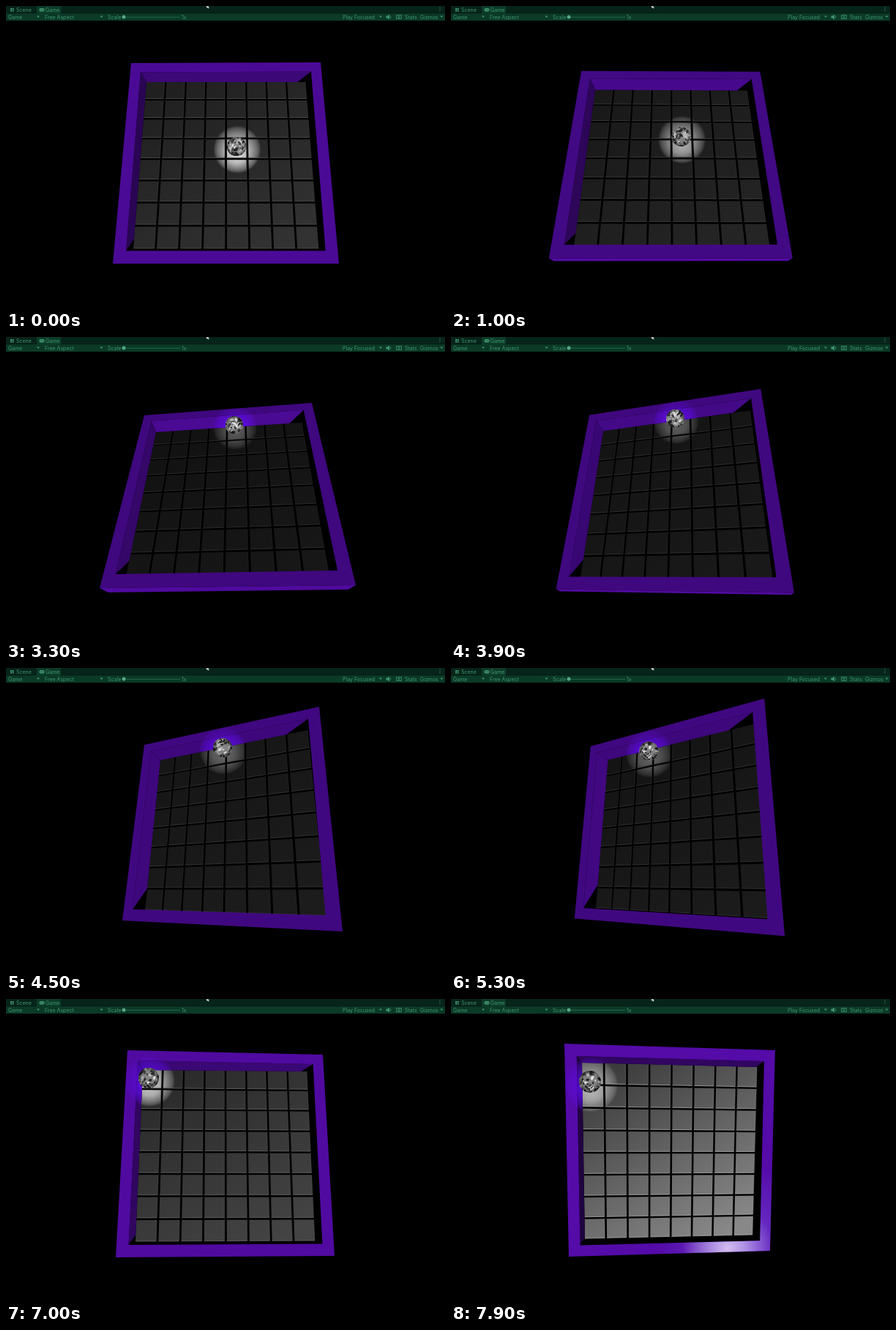
Write an HTML page with a canvas that moves like this. It is 600 px wide and 414 px high and loops after 8 s.

```html
<!DOCTYPE html>
<html lang="en">
<head>
<meta charset="utf-8">
<title>Tilting board</title>
<style>
  html, body { margin: 0; width: 100%; height: 100%; overflow: hidden; background: #000; }
  canvas, svg { position: absolute; left: 0; top: 0; display: block; }
  text { font: 7px Inter, "Open Sans", sans-serif; fill: #41966f; }
</style>
</head>
<body>
<canvas id="stage" width="600" height="414"></canvas>
<svg width="600" height="22" viewBox="0 0 600 22">
  <path d="M0 0H600V10H0z" fill="#07241a"/>
  <path d="M42 0H75V10H42z" fill="#0c3c29"/>
  <path d="M0 10H600V20H0z" fill="#0b3a27"/>
  <path d="M0 9.7H42M75 9.7H600" stroke="#051a12" stroke-width=".7"/>
  <g fill="#41966f">
    <path d="M6 3h2v2H6zM8.6 3h2v2h-2zM6 5.6h2v2H6zM8.6 5.6h2v2h-2z"/>
    <rect x="45.500" y="3" width="7" height="4.500" rx="2"/>
    <path d="M42 13.500h4l-2 2.500zM128.500 13.500h4l-2 2.500zM510 13.500h4l-2 2.500zM593.500 13.500h4l-2 2.500z"/>
    <circle cx="161" cy="15" r="2.500" fill="#57a985"/>
    <path d="M519.500 13.500h2l2.500-2v7l-2.500-2h-2z"/>
    <path d="M592.500 1.500h1v1h-1zM592.500 3.800h1v1h-1zM592.500 6.100h1v1h-1z"/>
  </g>
  <path d="M164 15.300H238" stroke="#2c7353" stroke-width=".8"/>
  <path d="M525 13q2 2 0 4M533.500 12.500h7v5h-7zM535 14.200h4M535 16h4" fill="none" stroke="#41966f" stroke-width=".8"/>
  <circle cx="48" cy="5.200" r=".7" fill="#0c3c29"/>
  <circle cx="50.500" cy="5.200" r=".7" fill="#0c3c29"/>
  <text x="14" y="7.800">Scene</text>
  <text x="54" y="7.800">Game</text>
  <text x="3" y="17.500">Game</text>
  <text x="53" y="17.500">Free Aspect</text>
  <text x="139" y="17.500">Scale</text>
  <text x="240" y="17.500">1x</text>
  <text x="460" y="17.500">Play Focused</text>
  <text x="545" y="17.500">Stats</text>
  <text x="566" y="17.500">Gizmos</text>
  <path d="M273.500 0l4.500 .8-1.300 .8 1 1.200-1 .7-1-1.300-1 .6z" fill="#ddd"/>
</svg>
<script>
const ctx = document.getElementById('stage').getContext('2d');
const LOOP = 8000, STEP = 100, RIM = 0.054, CELLS = 8, TILE = 0.9, SPAN = 7.9;
const times = [0, 2200, 3300, 4500, 6100, 7000, 7900];

// Corner order: back left, back right, front right, front left.
const rims = [
  [171, 78, 430, 77, 455, 352, 146, 352],
  [186, 101, 415, 101, 479, 337, 122, 338],
  [189, 107, 418, 90, 478, 339, 128, 343],
  [189, 105, 428, 53, 460, 360, 159, 345],
  [189, 104, 428, 41, 454, 367, 171, 341],
  [166, 70, 433, 76, 449, 351, 150, 353],
  [155, 61, 443, 70, 436, 344, 161, 352]
];
const floors = [
  [192, 104, 409, 104, 427, 331, 174, 331],
  [203, 126, 400, 126, 443, 325, 162, 325],
  [205, 130, 404, 117, 441, 322, 164, 327],
  [211, 126, 412, 85, 437, 338, 190, 330],
  [213, 122, 412, 77, 432, 341, 199, 325],
  [187, 97, 411, 99, 422, 330, 177, 331],
  [179, 87, 418, 93, 412, 322, 183, 327]
];
// x, y, radius, light strength
const balls = [
  [315, 192, 13, .85], [314, 159, 13, .42], [312, 120, 12, .3], [296, 109, 13, .34],
  [239, 118, 13, .36], [195, 108, 14, .75], [190, 113, 15, .62]
];
// grey back, grey front, rim, back wall, left wall, shadow start, lip, glow
const tones = [
  [32, 50, 75, 60, 42, .95, 0, 0],
  [17, 23, 58, 80, 48, .92, 7.5, 0],
  [18, 23, 63, 74, 52, .92, 6, 0],
  [22, 28, 64, 62, 62, .88, 0, 0],
  [20, 32, 66, 63, 64, .87, 0, 0],
  [42, 68, 80, 58, 48, .965, 0, 0],
  [60, 136, 84, 48, 32, .995, 0, 1]
];

function slope(rows, i, j) {
  const a = Math.max(i - 1, 0), b = Math.min(i + 1, rows.length - 1);
  return (rows[b][j] - rows[a][j]) / (times[b] - times[a]);
}
function sample(rows, t) {
  let i = 0;
  while (i < times.length - 2 && t >= times[i + 1]) i++;
  const d = times[i + 1] - times[i], p = Math.min((t - times[i]) / d, 1);
  const q = p * p * (3 - 2 * p);
  return rows[i].map((a, j) => a + (rows[i + 1][j] - a) * q +
    d * (slope(rows, i, j) * p * (1 - p) ** 2 - slope(rows, i + 1, j) * p * p * (1 - p)));
}

// Perspective map from the unit square to a quad.
function project([x0, y0, x1, y1, x2, y2, x3, y3]) {
  const ax = x1 - x2, bx = x3 - x2, sx = x0 - x1 + x2 - x3;
  const ay = y1 - y2, by = y3 - y2, sy = y0 - y1 + y2 - y3;
  const det = ax * by - bx * ay;
  const g = (sx * by - bx * sy) / det, h = (ax * sy - sx * ay) / det;
  return (u, v) => {
    const w = 1 + g * u + h * v;
    return [((x1 - x0 + g * x1) * u + (x3 - x0 + h * x3) * v + x0) / w,
            ((y1 - y0 + g * y1) * u + (y3 - y0 + h * y3) * v + y0) / w];
  };
}
const square = (map, a, b) => [map(a, a), map(b, a), map(b, b), map(a, b)];
const violet = k => `rgb(${k},${k * .13},${k * 2})`;
const grey = k => `rgb(${k},${k},${k})`;

function trace(...loops) {
  ctx.beginPath();
  for (const pts of loops) {
    pts.forEach(p => ctx.lineTo(...p));
    ctx.closePath();
    if (loops.length > 1 && pts !== loops.at(-1)) ctx.moveTo(...loops.at(-1)[0]);
  }
}
function paint(fills, ...loops) {
  trace(...loops);
  for (const f of fills) { ctx.fillStyle = f; ctx.fill('evenodd'); }
}
function radial(x, y, r, rgb, stops, fx = x, fy = y) {
  const g = ctx.createRadialGradient(fx, fy, 0, x, y, r);
  stops.forEach(([at, alpha]) => g.addColorStop(at, `rgba(${rgb},${alpha})`));
  return g;
}

let seed = 7;
const random = () => (seed = seed * 16807 % 2147483647) / 2147483647;
const specks = Array.from({ length: 150 }, () => {
  const z = random() * 2 - 1, a = random() * 2 * Math.PI, r = Math.sqrt(1 - z * z);
  return { x: r * Math.cos(a), y: r * Math.sin(a), z, size: .07 + random() * .1, tone: [35, 70, 190, 235][random() * 4 | 0] };
});

function drawBall(x, y, r) {
  ctx.save();
  ctx.translate(x, y);
  ctx.beginPath();
  ctx.arc(0, 0, r, 0, 7);
  ctx.fillStyle = '#888';
  ctx.fill();
  ctx.clip();
  const a = (y - 192) / 13, b = (x - 315) / 13;
  for (const s of specks) {
    const py = s.y * Math.cos(a) + s.z * Math.sin(a), z = s.z * Math.cos(a) - s.y * Math.sin(a);
    const px = s.x * Math.cos(b) + z * Math.sin(b), pz = z * Math.cos(b) - s.x * Math.sin(b);
    if (pz < 0) continue;
    ctx.fillStyle = grey(s.tone);
    ctx.beginPath();
    ctx.ellipse(px * r, py * r, s.size * r * 1.4, s.size * r * .8, s.x * 3, 0, 7);
    ctx.fill();
  }
  ctx.fillStyle = radial(0, 0, r, '0,0,0', [[0, 0], [.65, .08], [1, .6]], 0, -r * .2);
  ctx.fillRect(-r, -r, 2 * r, 2 * r);
  ctx.restore();
}

function drawTiles(floor, g0, g1, light) {
  const [x0, y0] = floor(.2, 0), [x1, y1] = floor(.8, 1);
  const shade = ctx.createLinearGradient(x0, y0, x1, y1);
  shade.addColorStop(0, grey(g0));
  shade.addColorStop(1, grey(g1));
  const edge = grey((g0 + g1) * .8 + 18);
  for (let j = 0; j < CELLS; j++) for (let i = 0; i < CELLS; i++) {
    const a = i / SPAN, b = (i + TILE) / SPAN, c = j / SPAN, d = (j + TILE) / SPAN;
    const pts = [floor(a, c), floor(b, c), floor(b, d), floor(a, d)];
    paint([shade, light], pts);
    ctx.strokeStyle = edge;
    ctx.lineWidth = .8;
    ctx.beginPath();
    ctx.moveTo(...pts[3]);
    ctx.lineTo(...pts[2]);
    ctx.stroke();
    ctx.lineWidth = .35;
    ctx.beginPath();
    ctx.moveTo(...pts[2]);
    ctx.lineTo(...pts[1]);
    ctx.stroke();
  }
}

function draw(t) {
  const top = project(sample(rims, t)), floor = project(sample(floors, t));
  const [x, y, r, power] = sample(balls, t);
  const [g0, g1, rim, back, left, shadow, lip, glow] = sample(tones, t);
  const outer = square(top, 0, 1), inner = square(top, RIM, 1 - RIM);
  const beam = (rgb, k) => radial(x + 1, y + 4, r * 2.5, rgb,
    [[0, k], [.45, k * .8], [.8, k * .4], [.92, k * .22], [1, 0]], x + 1, y + r * .9);
  const wallLight = beam('100,12,255', .85);

  ctx.fillStyle = '#000';
  ctx.fillRect(0, 0, 600, 414);
  drawTiles(floor, g0, g1, beam('255,255,255', power));
  paint([violet(back), wallLight], [inner[0], inner[1], floor(shadow, 0), floor(0, 0)]);
  paint([violet(left), wallLight], [inner[0], floor(0, 0), floor(0, shadow), inner[3]]);

  if (lip > .3) {
    const [rx, ry] = outer[2], [lx, ly] = outer[3];
    paint([violet(rim + 16)], [outer[3], outer[2], [rx - lip * 1.7, ry + lip], [lx + lip * 1.9, ly + lip]]);
  }
  const gleam = Math.max(glow, 0);
  paint([
    violet(rim),
    beam('100,12,255', .55),
    radial(395, 335, 110, '130,90,235', [[0, .6 * gleam], [1, 0]]),
    radial(378, 341, 62, '235,225,250', [[0, .8 * gleam], [.4, .5 * gleam], [1, 0]])
  ], outer, inner);
  drawBall(x, y, r);
}

const start = performance.now();
function tick(now) {
  const t = Math.max(now - start, 0) % LOOP;
  draw(Math.floor(t / STEP) * STEP);
  requestAnimationFrame(tick);
}
tick(start);
</script>
</body>
</html>
```
